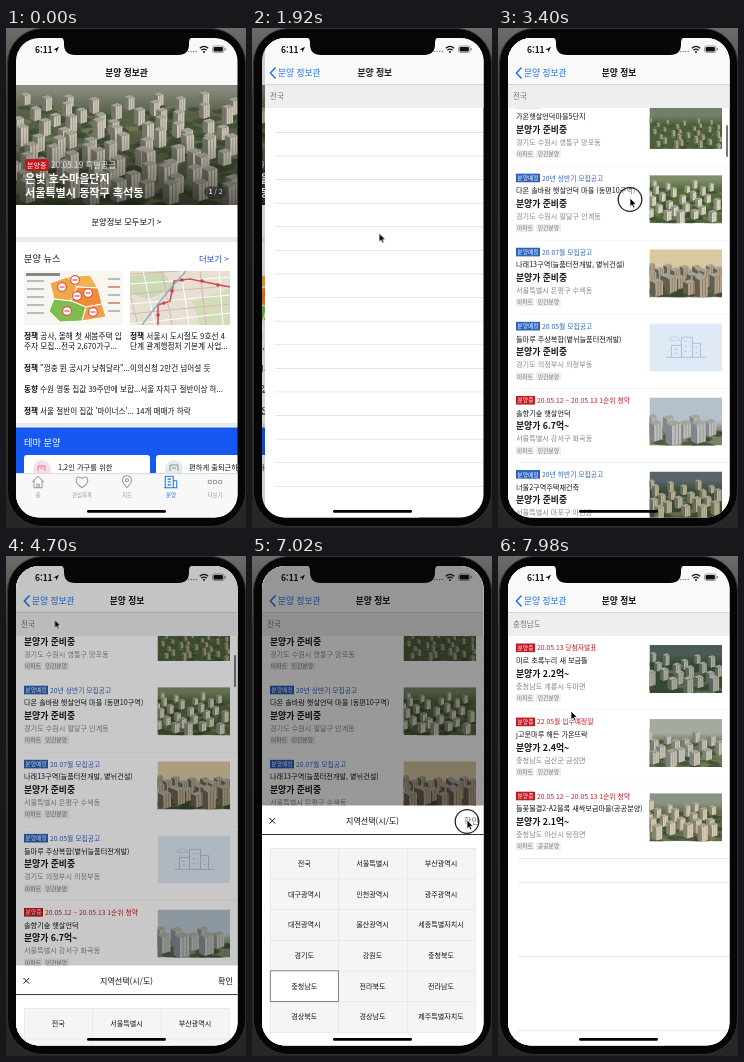
These frames come from a looping animation (240 by 500 pixels, 8 s). An HTML page:

```html
<!DOCTYPE html>
<html lang="ko">
<head>
<meta charset="utf-8">
<title>분양 정보</title>
<style>
html, body { margin: 0; width: 100%; height: 100%; overflow: hidden; background: #262626; }
svg { display: block; }
#stage { position: absolute; left: 0; top: 0; }
text { font-family: "Noto Sans CJK KR", "Noto Sans CJK JP", "Noto Sans CJK", sans-serif; white-space: pre; }
.anim { animation: 8s linear infinite; }
.step { animation: 8s step-end infinite; }

#home { animation-name: home; }
#homeDim { animation-name: homeDim; }
#tabs { animation-name: tabs; }
#homeTitle { animation-name: homeTitle; }
#pane { animation-name: pane; }
#title { animation-name: title; }
#chevron { animation-name: chevron; }
#back { animation-name: back; }
#scroll { animation-name: scroll; }
#bar { animation-name: bar; }
#rowsAll { animation-name: rowsAll; }
#rowsLocal { animation-name: rowsLocal; }
#areaAll { animation-name: areaAll; }
#areaLocal { animation-name: areaLocal; }
#dim { animation-name: dim; }
#sheet { animation-name: sheet; }
#picked { animation-name: picked; }
#cursor { animation-name: cursor; }
#press { animation-name: press; }

#home, #homeDim, #homeTitle, #pane, #title, #chevron { animation-timing-function: cubic-bezier(.3,.5,.2,1); }

@keyframes home { 0%, 19.05% { transform: translateX(0); } 25.3%, 100% { transform: translateX(-66px); } }
@keyframes homeDim { 0%, 19.05% { opacity: 0; } 25.3%, 100% { opacity: .18; } }
@keyframes tabs { 0% { opacity: 1; } 19.05%, 100% { opacity: 0; } }
@keyframes homeTitle {
  0%, 19.05% { transform: translateX(0); }
  25.3%, 100% { transform: translateX(-74px); }
  0%, 20% { opacity: 1; }
  22%, 100% { opacity: 0; }
}
@keyframes pane { 0%, 19.05% { transform: translateX(222px); } 25.3%, 100% { transform: translateX(0); } }
@keyframes title {
  0%, 19.05% { transform: translateX(130px); opacity: 0; }
  25.3%, 100% { transform: translateX(0); opacity: 1; }
}
@keyframes chevron { 0%, 19.05% { opacity: 0; } 25.3%, 100% { opacity: 1; } }
@keyframes back { 0%, 20% { opacity: 0; } 23%, 100% { opacity: 1; } }
@keyframes scroll {
  0%, 37.75% { transform: translateY(0); animation-timing-function: ease-in; }
  42.5% { transform: translateY(-90px); animation-timing-function: ease-out; }
  47%, 100% { transform: translateY(-106px); }
}
@keyframes bar {
  0%, 37.5% { transform: translateY(-14px); opacity: 0; }
  38% { transform: translateY(-14px); opacity: 1; animation-timing-function: ease-in; }
  42.5% { transform: translateY(0); opacity: 1; }
  47%, 58.75% { transform: translateY(2px); opacity: 1; }
  62%, 100% { transform: translateY(2px); opacity: 0; }
}
@keyframes rowsAll { 0% { opacity: 0; } 25.6% { opacity: 1; } 90.8%, 100% { opacity: 0; } }
@keyframes rowsLocal { 0% { opacity: 0; } 94%, 100% { opacity: 1; } }
@keyframes areaAll { 0% { opacity: 1; } 90.8%, 100% { opacity: 0; } }
@keyframes areaLocal { 0% { opacity: 0; } 90.8%, 100% { opacity: 1; } }
@keyframes dim {
  0%, 56.75% { opacity: 0; }
  60.5%, 90% { opacity: .4; }
  94.4%, 100% { opacity: 0; }
}
@keyframes sheet {
  0%, 56.75% { transform: translateY(241px); animation-timing-function: ease-in-out; }
  61.75%, 90% { transform: translateY(0); animation-timing-function: ease-in-out; }
  94.4%, 100% { transform: translateY(241px); }
}
@keyframes picked { 0% { opacity: 0; } 75.6%, 100% { opacity: 1; } }
@keyframes cursor {
  0%, 6.25% { transform: translate(150px,512px); animation-timing-function: ease-in-out; }
  15%, 21.9% { transform: translate(127px,193px); animation-timing-function: ease-in-out; }
  29.4%, 37.75% { transform: translate(128px,267px); animation-timing-function: ease-in; }
  42.5%, 46.25% { transform: translate(132px,170px); animation-timing-function: ease-in-out; }
  54.4%, 60% { transform: translate(48.5px,63.5px); animation-timing-function: ease-in-out; }
  72.5%, 80.4% { transform: translate(53px,430px); animation-timing-function: ease-in-out; }
  87.25%, 91% { transform: translate(215px,264px); animation-timing-function: ease-in-out; }
  98.75%, 100% { transform: translate(73px,155px); }
}
@keyframes press {
  0% { opacity: 0; } 16.6% { opacity: 1; } 18.5% { opacity: 0; }
  37.25% { opacity: 1; } 43% { opacity: 0; }
  54.75% { opacity: 1; } 56.5% { opacity: 0; }
  74.4% { opacity: 1; } 76.25% { opacity: 0; }
  87.5% { opacity: 1; } 89.75%, 100% { opacity: 0; }
}
</style>
</head>
<body>
<svg id="stage" width="240" height="500" viewBox="0 0 240 500"></svg>
<script>
const BLUE = '#2a5fbd', RED = '#c4161c', LINK = '#1d74ec', GREY = '#868686';

// y is the vertical middle of the line
const text = (x, y, s, size, fill = '#111', weight = 400, anchor = 'start') =>
  `<text x="${x}" y="${y + size * .37}" font-size="${size}" fill="${fill}" font-weight="${weight}" text-anchor="${anchor}">${s}</text>`;
const mid = (x, y, s, size, fill, weight) => text(x, y, s, size, fill, weight, 'middle');
const box = (x, y, w, h, fill, r = 0, more = '') =>
  `<rect x="${x}" y="${y}" width="${w}" height="${h}" fill="${fill}" rx="${r}" ${more}/>`;
const line = (d, stroke, width = 1, fill = 'none') =>
  `<path d="${d}" stroke="${stroke}" stroke-width="${width}" fill="${fill}" stroke-linejoin="round"/>`;
const shape = (d, fill) => `<path d="${d}" fill="${fill}"/>`;
const dot = (x, y, r, fill) => `<circle cx="${x}" cy="${y}" r="${r}" fill="${fill}"/>`;
const part = (id, kind, body) => `<g id="${id}" class="${kind}">${body}</g>`;
const frame = (x, y, w, h, body) => `<svg x="${x}" y="${y}" width="${w}" height="${h}">${body}</svg>`;
const range = n => [...Array(n).keys()];

function random(seed) {
  return () => (seed = (seed * 16807) % 2147483647) / 2147483647;
}

// Soft aerial view: trees and slab blocks in slanted rows, painted back to front
function scene(x, y, w, h, { sky, land, wall, shade, seed, count, tall, from = .3 }) {
  const r = random(seed * 7919), id = 'land' + seed;
  let s = `<linearGradient id="${id}" x2="0" y2="1"><stop stop-color="${sky}"/><stop offset="${from}" stop-color="${sky}"/>
    <stop offset="${from + .2}" stop-color="${land}"/></linearGradient>` + box(0, 0, w, h, `url(#${id})`);
  for (const i of range(count)) {
    const depth = (i + 1) / count, base = h * (from + .12 + (.9 - from) * depth);
    const size = tall * (.6 + .4 * depth), bw = size * .36, side = size * .24, bh = size * (.55 + .35 * r());
    const bx = w * ((i * .618 + r() * .08) % 1) - bw / 2;
    for (const k of range(3))
      s += `<ellipse cx="${bx + (r() - .3) * size * 2}" cy="${base + r() * 3}" rx="${size * (.25 + r() * .3)}" ry="${size * .14}" fill="${k ? '#34452d' : '#78835a'}" opacity=".6"/>`;
    s += shape(`M${bx} ${base}v${-bh}l${bw} ${-bw * .3}v${bh}z`, wall) +
      shape(`M${bx} ${base}v${-bh}l${-side} ${-side * .5}v${bh}z`, shade) +
      shape(`M${bx} ${base - bh}l${bw} ${-bw * .3}l${-side} ${-side * .5}l${-bw} ${bw * .3}z`, '#a4a59a') +
      line(`M${bx + bw * .35} ${base - 1}v${-bh}m${bw * .35} ${-bw * .1}v${bh}`, shade, size * .025);
  }
  return frame(x, y, w, h, s);
}

const views = {
  hero: { sky: '#85897e', land: '#565f44', wall: '#cfc8b6', shade: '#77756a', seed: 1, count: 85, tall: 27, from: .04 },
  hills: { sky: '#71806a', land: '#4b613d', wall: '#b3aa8a', shade: '#6d7158', seed: 2, count: 30, tall: 8 },
  park: { sky: '#7f8d69', land: '#52693a', wall: '#e2dfcf', shade: '#878a75', seed: 3, count: 26, tall: 14, from: .1 },
  sunset: { sky: '#d9c9a0', land: '#55593f', wall: '#b9a68a', shade: '#625b50', seed: 4, count: 20, tall: 22, from: .38 },
  street: { sky: '#b4c0cb', land: '#76846a', wall: '#bdbcb7', shade: '#7f868d', seed: 6, count: 8, tall: 26, from: .5 },
  night: { sky: '#586466', land: '#3c4c3a', wall: '#c1b795', shade: '#6f6b5d', seed: 7, count: 20, tall: 16, from: .2 },
  dusk: { sky: '#4a5b55', land: '#34492f', wall: '#aeb0a0', shade: '#58645e', seed: 9, count: 18, tall: 17, from: .2 },
  valley: { sky: '#a3aaa0', land: '#60704b', wall: '#cbc7b8', shade: '#7c8179', seed: 11, count: 16, tall: 18, from: .3 },
  ring: { sky: '#8b9483', land: '#5d6b47', wall: '#ddd2b8', shade: '#8c8270', seed: 13, count: 20, tall: 17, from: .2 }
};

const noPhoto = (x, y, w, h) => frame(x, y, w, h, box(0, 0, w, h, '#dfeaf6') +
  line('M17 34H57M22 34V22H32V34M32 34V14H43V34M43 34V20H51V34M35 18h2m3 0h1m-6 5h2m3 0h1m-6 5h2m3 0h1M25 26h3m-3 4h3M46 24h2m-2 5h2', '#a9bed9', .9) +
  line('M20 17q0-3 3-3q3-3 5 1q3 0 2 2z', '#b8cae0', .7));

const listing = ([status, when, name, price, place, kind, view], i) => {
  const y = 80 + i * 74.1, hot = status === '분양중', color = hot ? RED : BLUE, w = hot ? 19 : 24;
  return box(10, y, 222, 74.1, '#fff') + box(18, y + 7.5, w, 8.6, color) +
    mid(18 + w / 2, y + 11.8, status, 5.8, '#fff', 500) + text(20 + w, y + 11.8, when, 6.8, color) +
    text(18, y + 24.5, name, 7.15) + text(18, y + 37.3, price, 8.8, '#111', 700) +
    text(18, y + 50, place, 7.15, GREY) +
    box(18, y + 58, 18, 8, '#eee') + mid(27, y + 62, '아파트', 5.8, '#777') +
    box(38, y + 58, 25, 8, '#eee') + mid(50.5, y + 62, kind, 5.8, '#777') +
    (view ? scene(151.5, y + 9, 72.5, 48, views[view]) : noPhoto(151.5, y + 9, 72.5, 48)) + rule(y + 73.8);
};

const soon = '분양예정', open = '분양중', tbd = '분양가 준비중', priv = '민간분양';
const all = [
  [soon, '20.10월 모집공고', '푸른들녘주택2-3구획,상가복합4구획', tbd, '인천광역시 미추홀구 학익동', priv],
  [soon, '20년 하반기 모집공고', '가온햇살언덕마을5단지', tbd, '경기도 수원시 영통구 망포동', priv, 'hills'],
  [soon, '20년 상반기 모집공고', '다온 솔바람 햇살언덕 마을 (동편10구역)', tbd, '경기도 수원시 팔달구 인계동', priv, 'park'],
  [soon, '20.07월 모집공고', '나래13구역(늘품터전개발, 볕뉘건설)', tbd, '서울특별시 은평구 수색동', priv, 'sunset'],
  [soon, '20.05월 모집공고', '들마루 주상복합(볕뉘늘품터전개발)', tbd, '경기도 의정부시 의정부동', priv],
  [open, '20.05.12 ~ 20.05.13 1순위 청약', '솔향기숲 햇살언덕', '분양가 6.7억~', '서울특별시 강서구 화곡동', priv, 'street'],
  [soon, '20년 하반기 모집공고', '너울2구역주택재건축', tbd, '서울특별시 마포구 아현동', priv, 'night']
];
const local = [
  [open, '20.05.13 당첨자발표', '미르 초록누리 새 보금뜰', '분양가 2.2억~', '충청남도 계룡시 두마면', priv, 'dusk'],
  [open, '22.05월 입주예정일', 'j고운마루 해든 가온뜨락', '분양가 2.4억~', '충청남도 금산군 금성면', priv, 'valley'],
  [open, '20.05.12 ~ 20.05.13 1순위 청약', '들꽃물결2-A2블록 새싹보금마을(공공분양)', '분양가 2.1억~', '충청남도 아산시 탕정면', '공공분양', 'ring']
];

const regionMap = frame(18, 243, 99, 54, box(0, 0, 99, 54, '#f7f6f0') +
  line('M26 12L43 6 53 16 47 30 30 28z', '#fff', 1, '#f0a64a') + line('M43 6L66 4 74 17 53 16z', '#fff', 1, '#f3b04f') +
  line('M53 16L74 17 78 33 62 36 47 30z', '#fff', 1, '#f08a3c') + line('M30 28L47 30 62 36 58 50 36 51 25 40z', '#fff', 1, '#7fbd4f') +
  line('M62 36L78 33 82 46 58 50z', '#fff', 1, '#ef9f4a') +
  [[38, 16], [51, 9], [64, 22], [43, 40], [69, 41], [53, 25]].map(([x, y]) => dot(x, y, 5, '#e5573f') + dot(x, y, 3.8, '#fff') + box(x - 2.5, y - .7, 5, 1.4, '#d66')).join('') +
  range(5).map(i => box(3, 9 + i * 8, 17, 2, '#bbb') + box(84, 7 + i * 8, 12, 2, i % 2 ? '#d98' : '#bbb')).join('') + box(2, 2, 34, 3, '#888'));

const railMap = frame(124, 243, 100, 54, box(0, 0, 100, 54, '#e6e0d2') +
  shape('M0 5L32 0 45 17 18 28 0 22z', '#cbd9b5') + shape('M62 30L100 18V54H70z', '#d2dcb9') +
  range(6).map(i => line(`M${i * 19 - 6} 0L${i * 17 + 8} 54M0 ${i * 10 + 3}L100 ${i * 9 - 3}`, i % 2 ? '#fff' : '#d6b7ad', 1)).join('') +
  line('M28 54V34L40 30 44 10 60 8 100 16', '#c9545c', 1.6) + line('M12 54Q34 24 56 0', '#8aa9c7', 1.4) +
  [[28, 44], [34, 32], [42, 20], [52, 9], [72, 10], [88, 14]].map(([x, y]) => dot(x, y, 1.8, '#d63c45')).join(''));

const news = (y, label, body) => text(18, y, `<tspan font-weight="700">${label}</tspan> ${body}`, 7.6);

const home = box(10, 10, 222, 480, '#fff') + box(10, 10, 222, 47, '#f9f9f9') +
  scene(10, 57, 222, 120, views.hero) + box(10, 57, 222, 120, 'url(#shade)') +
  box(19, 131, 23.5, 12, RED, 2) + mid(30.7, 137, '분양중', 7, '#fff', 500) +
  text(45, 137, '20.05.19 특별공급', 8.3, '#dcdcd6') +
  text(19, 151, '은빛 호수마을단지', 11.1, '#fff', 700) + text(19, 165, '서울특별시 동작구 흑석동', 11.1, '#fff', 700) +
  box(198, 158.5, 23, 11, '#333', 5.5, 'opacity=".75"') + mid(209.5, 164, '<tspan font-weight="700">1</tspan> / 2', 6.5, '#eee') +
  mid(120.5, 194, '분양정보 모두보기 &gt;', 8.25) + box(10, 209, 222, 5, '#ebebeb') +
  text(18, 231, '분양 뉴스', 9.2, '#111', 500) + text(223, 231, '더보기 &gt;', 8.4, '#1f4fd0', 500, 'end') +
  regionMap + railMap +
  text(18, 308, '<tspan font-weight="700">정책</tspan> 공사, 올해 첫 새봄주택 입', 7.7) + text(18, 318, '주자 모집...전국 2,670가구...', 7.7) +
  text(124, 308, '<tspan font-weight="700">정책</tspan> 서울시 도시철도 9호선 4', 7.7) + text(124, 318, '단계 관계행정처 기본계 사업...', 7.7) +
  news(340, '정책', '"껑충 뛴 공시가 낮춰달라"...이의신청 2만건 넘어설 듯') +
  news(361.5, '동향', '수원 영통 집값 39주만에 보합...서울 자치구 절반이상 하...') +
  news(383.5, '정책', "서울 절반이 집값 '마이너스'... 14개 매매가 하락") +
  box(10, 395, 222, 4.5, '#ebebeb') + box(10, 399.5, 222, 45.5, '#1659f2') + text(18, 414.5, '테마 분양', 9.2, '#fff', 500) +
  frame(10, 426, 230, 19, box(8, 1, 126, 30, '#fff', 3) + box(140, 1, 100, 30, '#fff', 3) +
    dot(26, 15, 9, '#fbdde3') + line('M22 17v-5h7v5m-5-3h3', '#d87b92', 1) + dot(158, 15, 9, '#e3ece9') + line('M154 17v-6h8v6m-6-3h4', '#7c9890', 1) +
    text(42, 13.5, '1,2인 가구를 위한', 7.3) + text(173, 13.5, '편하게 출퇴근하', 7.3));

const tab = (x, name, color, icon) => `<g transform="translate(${x} 454) scale(1.15)">${line(icon, color, .9)}</g>` + mid(x, 467, name, 5.5, color);
const ring = x => `M${x} 0a1.5 1.5 0 1 0 3 0a1.5 1.5 0 1 0-3 0`;
const tabs = box(10, 445, 222, 45, '#f8f8f8') + box(10, 445, 222, .6, '#ccc') +
  tab(32, '홈', '#999', 'M-5 0L0-5 5 0M-3.5-1V5H3.5V-1M-1 5V2H1V5') +
  tab(76, '관심목록', '#999', 'M0 5C-9-1-4-7 0-3C4-7 9-1 0 5z') +
  tab(121, '지도', '#999', 'M0 5C-7-2-3-5.5 0-5.5S7-2 0 5zM-1.3-1.6a1.3 1.3 0 1 0 2.6 0a1.3 1.3 0 1 0-2.6 0') +
  tab(165, '분양', LINK, 'M-5 5V-5H2V5M2-1H5V5H-6M-3-2.5h3M-3 0h3M-3 2.5h3') +
  tab(209, '더보기', '#999', ring(-6) + ring(-1.5) + ring(3));

const rule = y => box(20, y, 212, .7, '#dcdcdc');
const pane = box(10, 10, 222, 480, '#fff') + range(16).map(i => rule(104 + i * 23.6)).join('') +
  part('rowsAll', 'step', part('scroll', 'anim', all.map(listing).join(''))) +
  part('rowsLocal', 'step', box(10, 80, 222, 410, '#fff') + local.map(listing).join('') + [326.5, 400.5, 474.5].map(rule).join('')) +
  box(10, 10, 222, 46, '#f9f9f9') + box(10, 56, 222, 24, '#eee') + box(10, 56, 222, .6, '#c8c8c8') +
  part('areaAll', 'step', text(15, 68.5, '전국', 7.5, '#777')) + part('areaLocal', 'step', text(15, 68.5, '충청남도', 7.5, '#777'));

const header = part('homeTitle', 'anim', mid(120.5, 45, '분양 정보관', 8.7, '#111', 700)) +
  part('title', 'anim', mid(121, 45, '분양 정보', 8.7, '#111', 700)) +
  part('chevron', 'anim', line('M23.5 39.5L18.3 45 23.5 50.5', LINK, 1.5)) +
  part('back', 'anim', text(26, 45, '분양 정보관', 8.7, LINK));

const status = text(29, 21.5, '6:11', 8.4, '#111', 700) + shape('M47.5 21.6L53 18.8 50.4 24.4 50 22z', '#111') +
  range(4).map(i => dot(182.5 + i * 2.6, 23.5, .8, '#888')).join('') +
  line('M193.8 20.2q4.2-3.6 8.4 0M195.4 22.2q2.6-2.2 5.2 0', '#111', 1.3) + dot(198, 24, 1, '#111') +
  box(206.5, 18, 11.5, 6.5, 'none', 2, 'stroke="#777" stroke-width=".7"') + box(207.6, 19.1, 9.3, 4.3, '#111', 1) + box(218.7, 20, 1, 2.5, '#777', .5);

const areas = ['전국', '서울특별시', '부산광역시', '대구광역시', '인천광역시', '광주광역시', '대전광역시', '울산광역시', '세종특별자치시',
  '경기도', '강원도', '충청북도', '충청남도', '전라북도', '전라남도', '경상북도', '경상남도', '제주특별자치도'];
const cellW = 68.4, cellH = 30.7;
const sheet = box(10, 249.5, 222, 245, '#fff') + line('M17.5 262l5.6 5.6m0-5.6l-5.6 5.6', '#111', 1) +
  mid(120.5, 264.8, '지역선택(시/도)', 8.05) + text(227, 264.8, '확인', 8.2, '#111', 400, 'end') + box(10, 278, 222, 1, '#333') +
  box(18, 292, cellW * 3, cellH * 6, '#f5f5f5') +
  range(4).map(i => box(18 + i * cellW, 292, .6, cellH * 6, '#e2e2e2')).join('') +
  range(7).map(i => box(18, 292 + i * cellH, cellW * 3, .6, '#e2e2e2')).join('') +
  part('picked', 'step', box(18.3, 292 + cellH * 4, cellW - .3, cellH, '#fff', 0, 'stroke="#777" stroke-width=".9"')) +
  areas.map((a, i) => mid(18 + cellW * (i % 3 + .5), 292 + cellH * (Math.floor(i / 3) + .5), a, 7.1)).join('');

document.getElementById('stage').innerHTML = `<defs>
  <clipPath id="screen"><rect x="10" y="10" width="221.5" height="479.5" rx="23"/></clipPath>
  <linearGradient id="desk" x2="0" y2="1"><stop stop-color="#6c6c69"/><stop offset=".15" stop-color="#3a3a39"/><stop offset="1" stop-color="#262626"/></linearGradient>
  <linearGradient id="shade" x2="0" y2="1"><stop offset=".4" stop-opacity="0"/><stop offset="1" stop-opacity=".5"/></linearGradient></defs>` +
  box(0, 0, 240, 500, 'url(#desk)') + box(1.5, .5, 238, 498, '#060606', 35, 'stroke="#303030" stroke-width="1"') +
  `<g clip-path="url(#screen)">` +
  part('home', 'anim', home) + part('tabs', 'step', tabs) +
  part('homeDim', 'anim', box(10, 10, 222, 480, '#000')) + part('pane', 'anim', pane) +
  part('bar', 'anim', box(228, 97, 2, 32, '#777', 1)) + header + status +
  part('dim', 'anim', box(10, 10, 222, 480, '#000')) + part('sheet', 'anim', sheet) +
  box(81, 482, 79, 2.8, '#000', 1.4) +
  shape('M54 9Q58 10 58 14V16Q58 27 69 27H172Q183 27 183 16V14Q183 10 187 9z', '#060606') + '</g>' +
  part('cursor', 'anim',
    part('press', 'step', `<circle cy="1.5" r="11.8" fill="#fff" fill-opacity=".4" stroke="#222" stroke-width="1.3"/>`) +
    line('M0 0V8.6L2 6.9 3.4 10 4.9 9.3 3.5 6.3H6.2z', '#fff', .7, '#000'));
</script>
</body>
</html>
```
